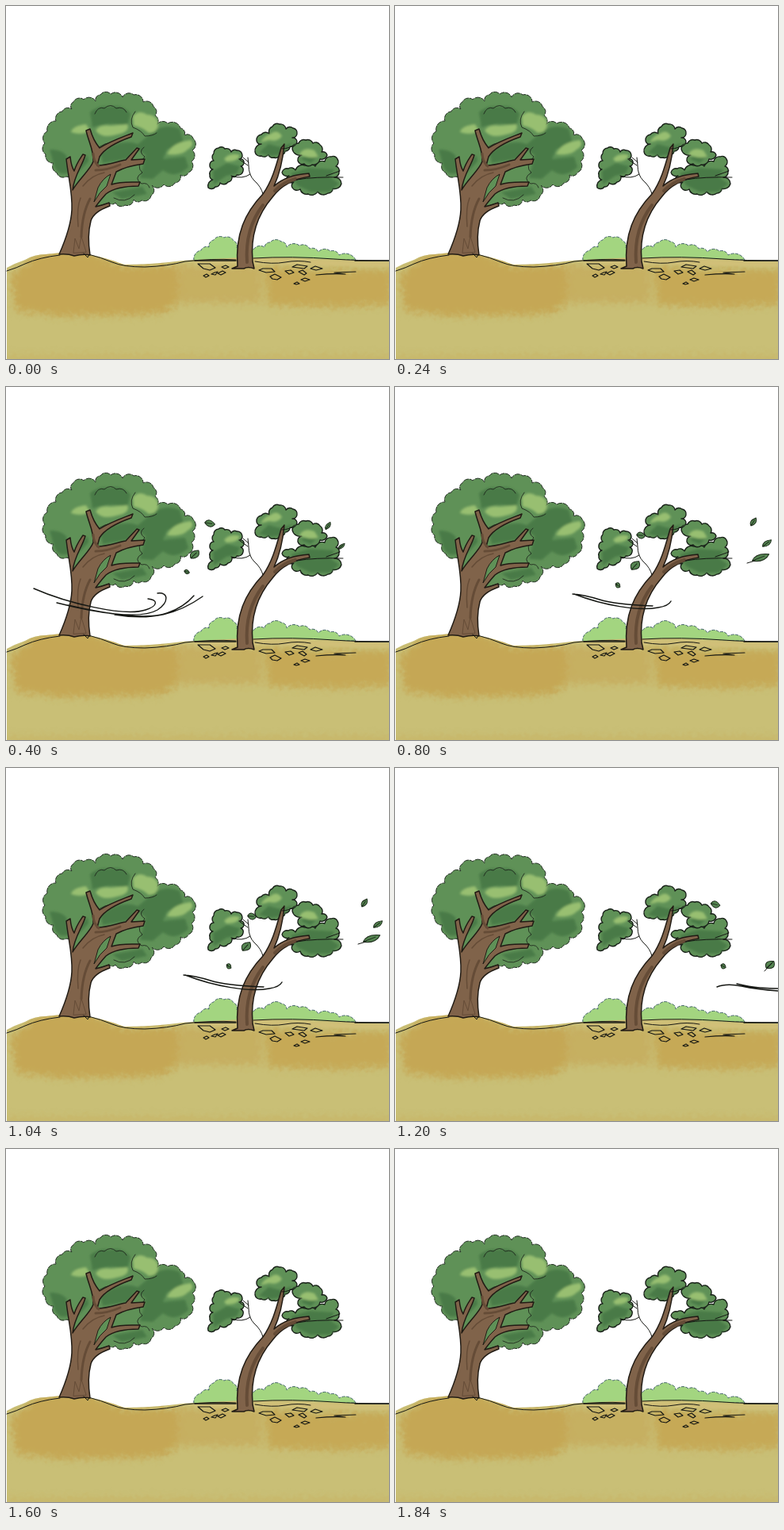
Recreate the animation shown at these times as an HTML page. Size 483 px wide and 445 px high, loop 2 s.

```html
<!DOCTYPE html>
<html lang="en">
<head>
<meta charset="utf-8">
<title>Trees in the wind</title>
<style>
html, body { margin: 0; width: 100%; height: 100%; overflow: hidden; background: #fff; }
svg { display: block; width: 483px; height: 445px; }
.ink { fill: none; stroke: #151713; stroke-width: 1.4; stroke-linecap: round; stroke-linejoin: round; }
.thin { stroke-width: 1; }
.bark { fill: #80634a; stroke: #211b14; stroke-width: 1.5; stroke-linejoin: round; }
.shade { fill: none; stroke: #654c37; stroke-linecap: round; }
.mid { fill: #5f9157; }
.dark { fill: #497a47; }
.light { fill: #98bf71; }
.leaf { fill: #568652; stroke: #1c2a1a; stroke-width: 1; stroke-linejoin: round; }
.gust { opacity: 0; animation: show 2s step-end infinite; }
#gust1 { animation-delay: .4s; }
#gust2 { animation-delay: .8s; }
#gust3 { animation-delay: 1.2s; }
@keyframes show { 0% { opacity: 1; } 20%, 100% { opacity: 0; } }
</style>
</head>
<body>
<svg viewBox="0 0 483 445">
  <defs>
    <filter id="soft" x="-30%" y="-30%" width="160%" height="160%"><feGaussianBlur stdDeviation="1.6"/></filter>
    <filter id="sponge" x="-15%" y="-30%" width="130%" height="160%">
      <feGaussianBlur stdDeviation="4" result="b"/>
      <feTurbulence type="fractalNoise" baseFrequency=".16" numOctaves="2" seed="4"/>
      <feDisplacementMap in="b" scale="13" xChannelSelector="R" yChannelSelector="G"/>
    </filter>
    <clipPath id="soil"><path id="soilShape" d="M1,445V330Q12,324 24,320Q36,313 50,313Q80,309 104,313Q128,318 149,326Q178,326 205,323Q228,320 240,320Q300,316 360,317Q424,320 483,322V445Z"/></clipPath>
  </defs>

  <g id="bush"></g>

  <g clip-path="url(#soil)">
    <rect y="300" width="483" height="145" fill="#c9bf76"/>
    <g filter="url(#sponge)" fill="#c5a754">
      <path d="M6,340L42,310H104L148,328H216V374Q204,390 165,389L70,391L12,384Z"/>
      <path d="M210,328H322V374H216Z" opacity=".62"/>
      <path d="M326,328L395,333L486,332V376L420,380L330,377Z" opacity=".88"/>
      <path d="M0,440H483V449H0Z" opacity=".4"/>
    </g>
    <path d="M236,321Q300,317 350,319L483,323V329L350,326L240,326Z" fill="#d0bf78" filter="url(#soft)"/>
  </g>
  <path class="ink thin" d="M1,334Q14,330 24,325Q42,317 68,314M104,313Q120,317 134,323Q148,329 175,329Q204,328 226,322Q260,318 290,320M312,318Q360,315 414,319Q440,321 483,321"/>
  <path class="ink" d="M238,321H290M440,321H483"/>
  <path class="ink thin" d="M314,322Q336,326 352,323T384,323"/>

  <g id="stones" class="ink" style="stroke-width:1.2">
    <path d="M242,325L257,325L264,330L257,333L249,331ZM272,329L277,327L281,329L276,331ZM249,340L253,338L256,340L252,342ZM259,338L263,336L267,335L264,339ZM267,337L273,334L277,336L271,339Z"/>
    <path d="M319,333L324,331L335,331L339,335L328,336ZM333,341L339,338L347,342L342,345L336,344ZM352,334L359,333L363,336L357,338ZM361,329L367,326L380,328L376,331ZM369,335L374,333L379,337L376,339ZM384,331L390,328L399,331L391,333ZM372,345L377,343L383,345L377,347ZM363,350L367,348L370,350L366,351Z"/>
    <path d="M391,339Q412,337 428,338L414,336L441,335"/>
  </g>

  <g id="bigTree">
    <g id="bigCrown"></g>
    <g filter="url(#soft)">
      <path class="dark" d="M106,134Q118,124 130,127Q147,123 157,136L153,151Q131,145 109,153ZM55,181Q68,180 76,188L80,210Q66,215 61,202ZM187,157Q203,148 219,155L224,172L203,181L198,193L226,190L230,203Q213,219 198,207L185,218L169,217L176,188L162,178Z"/>
      <path class="dark" d="M119,185Q144,166 166,174L157,192L122,198ZM134,235L172,228L178,237L146,243ZM88,213L104,196L103,188L96,194Z"/>
      <path class="light" d="M82,159Q84,151 101,149L106,157Q96,164 82,159ZM113,157Q118,149 132,151L153,149Q157,159 140,162Q121,168 113,157ZM160,139Q168,130 178,137Q191,137 192,150Q191,160 180,160Q171,152 161,151ZM203,187Q209,172 233,169Q239,175 229,181Q222,189 203,187Z"/>
    </g>
    <path class="ink thin" d="M163,133Q155,143 160,153Q171,157 175,164Q185,164 190,160M112,136Q116,126 124,129Q132,122 139,129Q148,126 152,134M174,178Q166,184 175,190Q163,203 172,210Q160,217 171,224Q179,222 181,229M117,178Q125,173 132,172M136,242Q150,250 162,238" opacity=".75"/>
    <path class="bark" d="M67,313C75,295 82,277 83,257C84,235 79,219 76,193L81,190C82,200 84,205 86,208C89,198 93,193 97,187L100,188C96,202 86,213 84,232C92,218 106,207 110,196C111,182 104,171 101,157L106,155C109,166 113,173 118,179C130,171 145,166 160,160L158,165C141,171 124,180 118,190L115,201C129,201 143,195 151,194L165,179L168,180L158,194L175,193L173,199C158,201 148,204 139,209L133,225C144,221 155,222 169,222L167,227C149,227 135,230 126,237Q118,246 113,253Q122,251 130,248L131,252C117,257 109,264 107,271C103,286 104,301 106,314Q98,312 86,315Q78,312 67,313Z"/>
    <path d="M111,247Q118,234 127,227L132,212Q122,217 116,229Z" fill="#5f9157" stroke="#211b14"/>
    <path class="shade" d="M113,207Q128,207 144,200M110,186Q110,196 117,202M95,291Q96,261 106,243" stroke-width="3"/>
    <path class="shade" d="M85,311L87,293L92,306L95,290L101,310Z" fill="#654c37" stroke-width="1"/>
    <path class="shade" d="M97,227Q108,213 124,210M91,278Q89,254 94,242" stroke-width="1.5"/>
    <path class="ink thin" d="M98,312L103,317L105,313"/>
  </g>

  <g id="smallTree">
    <g id="smallCrown"></g>
    <g filter="url(#soft)">
      <path class="dark" d="M261,208L279,198L295,202L291,211L278,214L262,225ZM319,185L331,174L346,178L363,172L347,187L334,189ZM372,193L381,186L394,189L384,198ZM359,211L382,204L414,206L409,216L420,224L408,234L384,234L367,226Z"/>
      <path class="light" d="M275,193Q282,184 295,188Q292,197 278,196ZM321,172Q326,163 334,161Q342,155 348,164Q342,172 332,169ZM370,187Q375,177 389,182L394,190Q382,193 370,187Z"/>
    </g>
    <path class="ink thin" d="M324,237Q322,228 313,220Q306,213 306,201L305,191M284,214Q298,219 308,212M295,194L305,201M299,191L306,197"/>
    <path class="bark" d="M285,331L292,328C289,288 301,261 324,237C336,220 341,200 347,179L351,174C349,196 344,214 338,227C350,216 366,212 382,211L383,215C362,218 347,226 336,241C317,263 308,289 311,322L313,331Q305,328 300,331Z"/>
    <path class="shade" d="M304,323Q301,281 324,251M339,233Q350,222 365,218" stroke-width="4"/>
    <path class="ink thin" d="M366,219Q390,215 425,216M348,180Q358,180 364,174M404,214L421,208"/>
  </g>

  <g id="gust1" class="gust">
    <path class="ink" d="M35,254C76,272 149,290 176,281C192,276 192,268 179,267M64,272C111,284 169,294 191,281C206,271 205,258 191,260M78,275C126,286 179,294 203,285Q224,278 237,263M137,287C184,295 217,286 248,264"/>
  </g>
  <g id="gust2" class="gust">
    <path class="ink" d="M224,261Q239,262 258,268T325,276M226,261C262,275 307,283 332,278Q345,276 348,270"/>
  </g>
  <g id="gust3" class="gust">
    <path class="ink" d="M406,276Q418,271 437,275T483,281M431,272Q447,276 460,277T483,278"/>
  </g>
</svg>
<script>
const $ = id => document.getElementById(id);

function add(parent, d, attrs) {
  const path = document.createElementNS('http://www.w3.org/2000/svg', 'path');
  path.setAttribute('d', d);
  for (const key in attrs) path.setAttribute(key, attrs[key]);
  parent.append(path);
}

// Joins "x,y" points with outward bulging arcs.
function scallop(text, roundness) {
  const points = text.split(' ').map(p => p.split(',').map(Number));
  return points.map(([x, y], i) => {
    if (!i) return `M${x},${y}`;
    const [px, py] = points[i - 1];
    const r = Math.hypot(x - px, y - py) * roundness;
    return `A${r},${r} 0 0 1 ${x},${y}`;
  }).join('');
}

add($('bush'), scallop('237,321 246,308 256,304 262,295 275,292 287,296 291,305 312,307 326,304 333,298 347,297 354,304 370,302 383,306 394,310 409,309 420,314 441,320', .7) + 'Z',
  { fill: '#a3d580', stroke: '#45656b', 'stroke-width': 1, 'stroke-dasharray': '4 1.5' });

add($('bigCrown'), scallop('52,158 63,145 71,133 83,130 85,121 98,118 113,120 119,112 132,111 147,115 161,112 173,121 186,127 188,138 190,150 204,148 220,154 225,163 236,167 235,182 234,196 230,210 220,213 213,223 199,225 184,226 183,239 171,245 161,244 150,251 138,248 130,248', .62)
  + 'L109,255L84,232L85,210' + scallop('85,210 76,215 64,210 60,198 50,187 49,173 52,158', .62).replace('M', 'L') + 'Z',
  { class: 'mid', stroke: '#252f25', 'stroke-width': 1, 'stroke-dasharray': '7 1' });

const clusters = [
  '262,186 268,179 276,180 284,184 291,182 298,188 294,193 300,196 296,202 299,208 291,213 285,215 280,222 270,223 264,228 255,229 261,219 257,213 261,206 257,200 262,195 262,186',
  '348,210 356,205 365,207 377,201 390,202 402,196 410,190 418,193 416,202 420,209 414,216 423,224 412,230 406,236 393,234 381,237 371,231 361,229 363,222 354,219 357,214 348,210',
  '361,180 369,173 378,169 387,173 396,175 398,184 405,188 396,193 386,200 376,199 368,195 373,188 361,180',
  '314,184 322,174 316,170 322,162 332,161 336,152 345,149 353,155 362,154 367,161 361,166 367,171 358,177 352,183 345,188 338,191 331,187 322,189 314,184'
];
clusters.forEach(points => add($('smallCrown'), scallop(points, .68),
  { class: 'mid', stroke: '#182018', 'stroke-width': 1.4, 'stroke-linejoin': 'round' }));

// Each leaf: x, y, length, width, angle.
const gusts = {
  gust1: [[257, 172, 13, 8, 10], [238, 211, 14, 9, -45], [228, 233, 7, 5, 15], [406, 175, 11, 5, -58], [423, 201, 11, 4, -42]],
  gust2: [[310, 187, 11, 8, 5], [303, 225, 14, 10, -48], [281, 250, 7, 6, 35], [452, 170, 12, 6, -58], [469, 197, 14, 6, -38], [461, 215, 23, 8, -22]],
  gust3: [[404, 172, 12, 8, 12], [414, 250, 7, 6, 25], [473, 248, 13, 10, -42]]
};
for (const id in gusts) {
  for (const [x, y, length, width, angle] of gusts[id]) {
    const a = length / 2;
    add($(id), `M${-a},0Q${-a / 3},${-width} ${a},0Q${a / 4},${width} ${-a},0M${-a},0L${a / 2},0`,
      { class: 'leaf', transform: `translate(${x} ${y}) rotate(${angle})` });
  }
}
add($('gust2'), 'M444,222L454,219', { class: 'ink thin' });
add($('gust3'), 'M466,256L477,244', { class: 'ink thin' });
</script>
</body>
</html>
```
